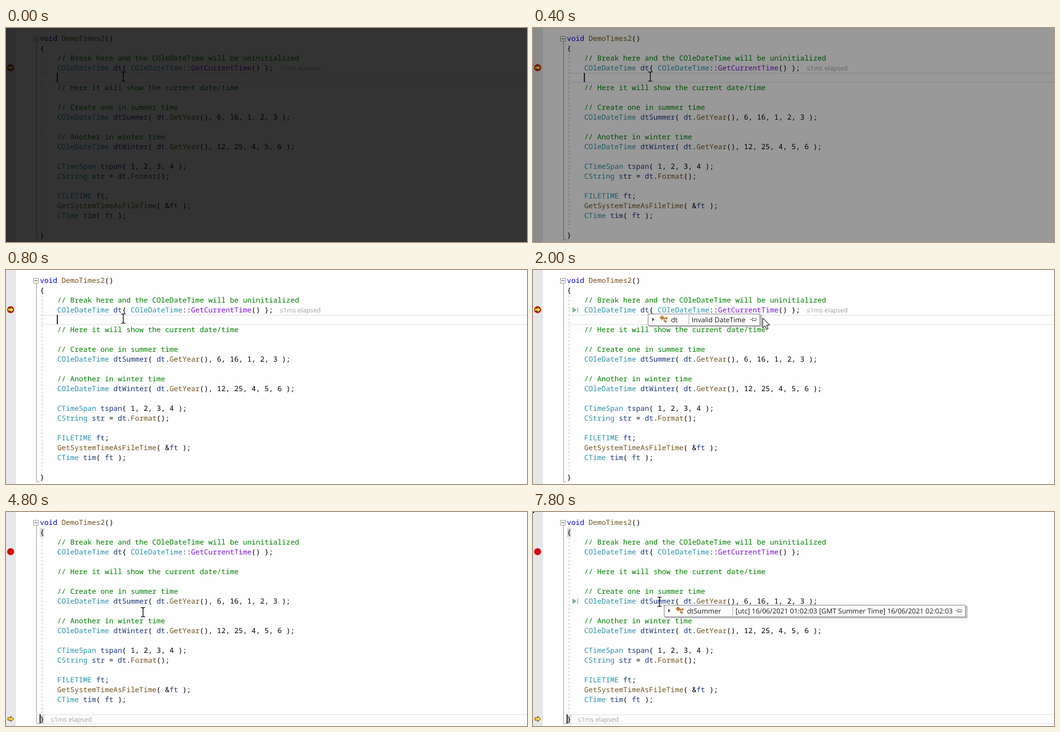
An HTML page that plays this animation: 844 by 348 pixels, repeating every 8 s.

```html
<!DOCTYPE html>
<html lang="en">
<head>
<meta charset="utf-8">
<title>Debugger date tips</title>
<style>
html, body { margin: 0; width: 100%; height: 100%; overflow: hidden; background: #fefefe; }
svg { display: block; width: 844px; height: 348px; }
text { white-space: pre; text-rendering: geometricPrecision; }
#code { font: 11.667px "Noto Sans Mono", "DejaVu Sans Mono", monospace; }
.ui { font: 11.15px "Open Sans", "Noto Sans", sans-serif; fill: #1e1e1e; }
.perf { font: 10.4px "Open Sans", "Noto Sans", sans-serif; fill: #a0a0a0; }
</style>
</head>
<body>
<svg viewBox="0 0 844 348">
  <defs>
    <path id="next" d="M-4.5-2H0V-4.5L5 0 0 4.5V2H-4.5Z" fill="#ffd83b" stroke="#6b4b12"/>
    <g id="node" fill="#c87f2f">
      <path d="M0 3.5 4-.5 8 3.5 4 7.5Z"/>
      <path d="M6 4.5H10M7.5 4.5V9.5H9" fill="none" stroke="#555"/>
      <path d="M8.500 4.500 11 2 13.500 4.500 11 7ZM7.500 9.500 10 7 12.500 9.500 10 12Z"/>
    </g>
    <path id="pin" d="M0 4.500H4M4.500 1V8M4.500 2.500H10.500V6.500H4.500M5 5.800H10.500" fill="none" stroke="#8a8a8a"/>
  </defs>
  <rect width="844" height="348" fill="#fefefe"/>
  <rect width="16" height="348" fill="#e6e7e8"/>
  <g id="row" fill="none" stroke="#e2e2e6"><path d="M55 73.500H844M55 88.500H844"/></g>
  <g id="braces" fill="#dcdcdc"><path d="M55 26h7v15h-7ZM55 330h7v14h-7Z"/></g>
  <path d="M58.500 42V330" stroke="#bdbdbd" stroke-dasharray="3 3"/>
  <g fill="none" stroke="#a5a5a5">
    <path d="M49.500 22V344.500H54"/>
    <path d="M44.500 13.500H52.500V21.500H44.500Z" fill="#fefefe"/>
    <path d="M46 17.500H51" stroke="#555"/>
  </g>
  <g id="code"></g>
  <circle cx="7.500" cy="64.500" r="5.700" fill="#d20f0f"/>
  <use id="ip" href="#next"/>
  <text id="perf" class="perf">≤1ms elapsed</text>
  <g id="run"><path d="M64 -4.500V4.500L70.500 0Z" fill="#74b58a"/><path d="M72.500-4.500V4.500" stroke="#74b58a"/></g>
  <rect id="caret" width="1.500" height="15"/>
  <g id="tips"></g>
  <path id="beam" d="M-3.500-7.500H-1L0-6.500 1-7.500H3.500M0-6.500V6.500M-3.500 7.500H-1L0 6.500 1 7.500H3.500" fill="none" stroke="#000" stroke-width="1.200"/>
  <path id="arrow" d="M0 0V16L3.700 12.600 6.300 18.500 8.800 17.400 6.300 11.700H11.500Z" fill="#fff" stroke="#000"/>
  <rect id="speck" width="2" height="1.500"/>
  <rect id="shade" width="844" height="348"/>
</svg>
<script>
const $ = id => document.getElementById(id);
const LOOP = 8000, STEP = 200;

const source = `void DemoTimes2()
{
    // Break here and the COleDateTime will be uninitialized
    COleDateTime dt{ COleDateTime::GetCurrentTime() };

    // Here it will show the current date/time

    // Create one in summer time
    COleDateTime dtSummer( dt.GetYear(), 6, 16, 1, 2, 3 );

    // Another in winter time
    COleDateTime dtWinter( dt.GetYear(), 12, 25, 4, 5, 6 );

    CTimeSpan tspan( 1, 2, 3, 4 );
    CString str = dt.Format();

    FILETIME ft;
    GetSystemTimeAsFileTime( &ft );
    CTime tim( ft );

}`;
const colours = [
  [/^\/\//, '#008000'],
  [/^void$/, '#0000d8'],
  [/^(C[A-Z]|FILETIME)/, '#2b91a8'],
  [/^GetCurrentTime$/, '#7a14d8'],
  [/^(Get|Format|Demo)/, '#74531f'],
  [/^[a-z]/, '#1f377f'],
  [/^/, '#000']
];
const paint = token =>
  `<tspan fill="${colours.find(([rule]) => rule.test(token))[1]}">${token.replace('&', '&amp;')}</tspan>`;
$('code').innerHTML = source.split('\n').map((line, i) =>
  `<text x="55" y="${21 + 16 * i}">${(line.match(/\/\/.*|\w+|[^\w/]+/g) || []).map(paint).join('')}</text>`
).join('');

// Data tips: width and divider are offsets from the left edge
const tip = (id, x, y, w, divider, name, value) => `
  <g id="${id}" transform="translate(${x} ${y})">
    <rect x="2" y="2" width="${w + 1}" height="20" fill="#000" opacity=".22"/>
    <rect x=".5" y=".5" width="${w - 1}" height="19" fill="#fdfdfd" stroke="#8d8d96"/>
    <rect class="hover" x="17" y="2" width="${w - 19}" height="16" fill="#c9def5"/>
    <path d="M7 6.500V12.500L10.500 9.500Z" fill="#444"/>
    <use href="#node" x="19" y="3"/>
    <path d="M${divider + .5} 2V18" stroke="#b4b4bc"/>
    <text class="ui" x="37.500" y="13.500">${name}</text>
    <text class="ui" x="${divider + 5}" y="13.500">${value}</text>
    <use href="#pin" x="${w - 17}" y="5"/>
  </g>`;
$('tips').innerHTML =
  tip('tipDt', 186, 71, 182, 66, 'dt', 'Invalid DateTime') +
  tip('tipSummer', 212, 151, 489, 111, 'dtSummer',
    '[utc] 16/06/2021 01:02:03 [GMT Summer Time] 16/06/2021 02:02:03');

// Time, x, y, pointer
const mouse = [
  [0, 190, 79, 'beam'], [1200, 186, 73, 'beam'], [1400, 180, 66, 'beam'],
  [1800, 290, 78, 'arrow'], [2000, 372, 78, 'arrow'], [3600, 211.5, 78, 'arrow'],
  [3800, 200, 56, 'beam'], [4000, 203, 88, 'beam'], [4200, 210, 112, 'beam'],
  [4400, 216, 135, 'beam'], [4800, 222, 163, 'beam'], [5000, 213, 154, 'beam'],
  [5200, 205, 146, 'beam']
];
const blinks = [1000, 1600, 2000, 2600, 3200, 3600, 4200, 4800, 5200, 5600, 6200, 6800, 7200, 7800];

const show = (el, on) => el.style.display = on ? '' : 'none';
const place = (id, x, y) => $(id).setAttribute('transform', `translate(${x} ${y})`);

function draw(time) {
  const t = Math.floor(time % LOOP / STEP) * STEP;
  const within = (from, to) => t >= from && t < to;
  const atEnd = t >= 4800;

  $('shade').setAttribute('opacity', Math.max(0, .8 - t / 1000));
  show($('braces'), atEnd);
  show($('row'), !within(4600, 4800));
  place('row', 0, atEnd ? 256 : 0);
  place('ip', 7.5, atEnd ? 336.5 : 64.5);
  place('perf', atEnd ? 72 : 443, atEnd ? 341 : 69);
  place('caret', atEnd ? 54.5 : 82.5, atEnd ? 329 : 73);
  show($('caret'), blinks.filter(b => b <= t).length % 2 === 0);

  show($('run'), within(1400, 4000) || t >= 5200);
  place('run', 0, atEnd ? 145 : 65);
  show($('tipDt'), within(1600, 4000));
  show($('tipSummer'), t >= 5400);
  show($('speck'), t >= 6000);

  const [, x, y, kind] = mouse.filter(m => m[0] <= t).pop();
  for (const id of ['beam', 'arrow']) show($(id), id === kind);
  place(kind, x, y);
  const over = kind === 'arrow' && x < 368;
  document.querySelectorAll('.hover').forEach(el => show(el, over && el.parentNode.id === 'tipDt'));
}

function tick() {
  draw(performance.now());
  requestAnimationFrame(tick);
}
tick();
</script>
</body>
</html>
```
